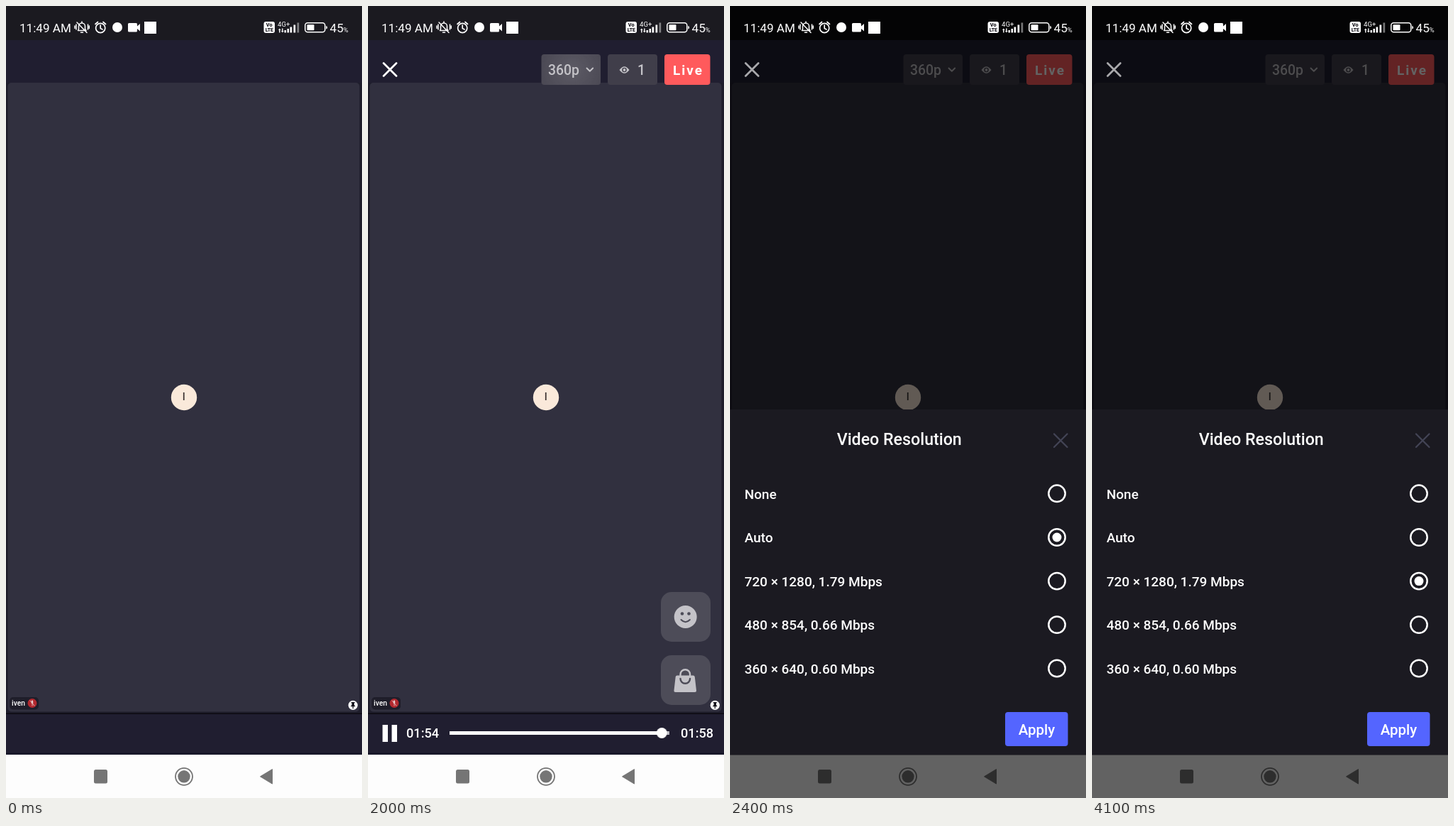
These frames come from a looping animation (502x1115 px, 4300 ms). An HTML page:

```html
<!DOCTYPE html>
<html lang="en">
<head>
<meta charset="utf-8">
<title>Live player</title>
<style>
html, body { margin: 0; width: 100%; height: 100%; overflow: hidden; background: #201e30; }
svg { display: block; width: 100vw; height: 100vh; }
text { font-family: Roboto, "Open Sans", sans-serif; font-weight: 500; fill: #fff; }
.soft { fill: #c4c3c8; }
.line { fill: none; stroke: #fff; stroke-linecap: round; stroke-linejoin: round; }
.mid { text-anchor: middle; }

/* 43 ticks of 100 ms; each value holds until the next */
.controls, .close, .t52, .t53, .t54, .knob, .played, .ripple, .dim, .sheet, .auto, .hd {
  animation: 4300ms step-end infinite;
}
.controls { animation-name: controls; }
.close { animation-name: close; }
.t52 { animation-name: t52; }
.t53 { animation-name: t53; }
.t54 { animation-name: t54; }
.knob { animation-name: knob; }
.played { animation-name: played; transform-origin: 115px 0; }
.ripple { animation-name: ripple; }
.dim { animation-name: dim; }
.sheet { animation-name: sheet; }
.auto { animation-name: auto; }
.hd { animation-name: hd; }

@keyframes controls { 0% { opacity: 0 } 13.953%, 100% { opacity: 1 } }
@keyframes close {
  0% { opacity: 0 } 13.953% { opacity: 1 } 48.837% { opacity: .82 }
  51.163% { opacity: .7 } 53.488%, 100% { opacity: .65 }
}
@keyframes t52 { 0% { opacity: 1 } 23.256%, 100% { opacity: 0 } }
@keyframes t53 { 0% { opacity: 0 } 23.256% { opacity: 1 } 46.512%, 100% { opacity: 0 } }
@keyframes t54 { 0% { opacity: 0 } 46.512%, 100% { opacity: 1 } }
@keyframes knob {
  0% { transform: translateX(410.5px) } 23.256% { transform: translateX(412px) }
  46.512%, 100% { transform: translateX(414.3px) }
}
@keyframes played {
  0% { transform: scaleX(295) } 23.256% { transform: scaleX(297) }
  46.512%, 100% { transform: scaleX(299) }
}
@keyframes ripple {
  0% { opacity: 0 } 44.186% { opacity: .5 } 46.512% { opacity: 1 }
  51.163% { opacity: .45 } 53.488%, 100% { opacity: 0 }
}
@keyframes dim {
  0% { opacity: 0 } 48.837% { opacity: .32 } 51.163% { opacity: .52 }
  53.488%, 100% { opacity: .61 }
}
@keyframes sheet {
  0% { opacity: 0; transform: translateY(223px) }
  48.837% { opacity: .38; transform: translateY(147px) }
  51.163% { opacity: .85; transform: translateY(33.5px) }
  53.488%, 100% { opacity: 1; transform: none }
}
@keyframes auto { 0% { opacity: 1 } 81.395%, 100% { opacity: 0 } }
@keyframes hd { 0% { opacity: 0 } 81.395%, 100% { opacity: 1 } }
</style>
</head>
<body>
<svg viewBox="0 0 502 1115" preserveAspectRatio="none">
  <defs>
    <radialGradient id="glow" gradientUnits="userSpaceOnUse" cx="288" cy="90" r="46">
      <stop offset="0" stop-color="#fff" stop-opacity=".15"/>
      <stop offset="1" stop-color="#fff" stop-opacity=".06"/>
    </radialGradient>
    <circle id="ring" cx="461" r="11.7" fill="none" stroke="#fff" stroke-width="2.5"/>
  </defs>

  <!-- Stage -->
  <rect width="502" height="1115" fill="#201e30"/>
  <rect width="502" height="48" fill="#1b1a20"/>
  <rect y="108" width="502" height="888" fill="#1e1d2b"/>
  <rect x="2.5" y="108" width="496" height="885.5" rx="5" fill="#31303f"/>
  <rect y="995.5" width="502" height="1.5" fill="#0c0b12"/>
  <rect y="1051" width="502" height="3" fill="#19182a"/>

  <!-- Participant -->
  <circle cx="251" cy="551" r="18.2" fill="#fae9da"/>
  <text class="mid" x="250.8" y="555.3" font-size="14" style="fill:#3a3230">I</text>
  <rect x="5" y="973" width="41" height="17.5" rx="5" fill="#1f1e2a"/>
  <text x="8" y="985" font-size="10.3">iven</text>
  <circle cx="37" cy="981.5" r="6.5" fill="#b3292f"/>
  <rect x="35.8" y="977.5" width="2.4" height="5" rx="1.2" fill="#e9c9ca"/>
  <path class="line" d="M34 978l6 7M37 983.500v1.500" style="stroke:#e9c9ca" stroke-width=".9"/>
  <circle cx="489.300" cy="984.300" r="6.600" fill="#fff"/>
  <path d="M486.800 980h5v1l-.8.500v2.500l1.300 1.500v.800h-2.400v3h-1.200v-3h-2.400v-.800l1.300-1.500v-2.500l-.8-.500z" fill="#15141c"/>

  <!-- Player controls -->
  <g class="controls">
    <rect x="244.500" y="68" width="83.500" height="43" rx="4" fill="#403e4a"/>
    <rect class="ripple" x="244.500" y="68" width="83.500" height="43" rx="4" fill="url(#glow)"/>
    <text class="soft" x="254" y="97.300" font-size="19.400">360p</text>
    <path class="line" d="M308.500 87.500l4.300 4.300 4.300-4.300" style="stroke:#c4c3c8" stroke-width="2"/>
    <rect x="338" y="68" width="70" height="43" rx="4" fill="#403e4a"/>
    <path class="soft" d="M354.500 90q7-9.500 14 0q-7 9.500-14 0z"/>
    <circle cx="361.500" cy="90" r="3.300" fill="#403e4a"/>
    <circle class="soft" cx="361.500" cy="90" r="1.900"/>
    <text class="soft" x="380" y="97.300" font-size="19.400">1</text>
    <rect x="418" y="68" width="64.500" height="43" rx="4" fill="#ff5a5c"/>
    <text x="430" y="97.300" font-size="19" style="font-weight:700;letter-spacing:2px">Live</text>

    <rect x="413" y="825" width="70" height="70" rx="15" fill="#4d4c58"/>
    <circle class="soft" cx="447.700" cy="860" r="16"/>
    <circle cx="443" cy="855.500" r="2.300" fill="#4d4c58"/>
    <circle cx="452.500" cy="855.500" r="2.300" fill="#4d4c58"/>
    <path class="line" d="M441.500 864q6.200 6.500 12.400 0" style="stroke:#4d4c58" stroke-width="2"/>
    <rect x="413" y="914" width="70" height="70" rx="15" fill="#4d4c58"/>
    <path class="soft" d="M436 942.500h22.500q2 0 2.300 2l2.200 19q.2 2.500-2.300 2.500h-27q-2.500 0-2.200-2.500l2.200-19q.3-2 2.300-2z"/>
    <path class="line" d="M440.500 942.500v-1.500a6.800 6.800 0 0 1 13.600 0v1.500" style="stroke:#c4c3c8" stroke-width="2.400"/>
    <path class="line" d="M440.500 947a6.800 6.800 0 0 0 13.600 0" style="stroke:#4d4c58" stroke-width="2.400"/>

    <path d="M20.500 1012h7.500v24h-7.500zM33.500 1012h7.500v24h-7.500z" fill="#fff"/>
    <g font-size="18.200">
      <text class="t52" x="54" y="1030.200">01:52</text>
      <text class="t53" x="54" y="1030.200">01:53</text>
      <text class="t54" x="54" y="1030.200">01:54</text>
      <text x="441" y="1030.200">01:58</text>
    </g>
    <rect x="115" y="1021" width="310" height="5" fill="#b9b8c0"/>
    <rect class="played" x="115" y="1021" width="1" height="5" fill="#fff"/>
    <circle class="knob" cy="1023.500" r="7.500" fill="#fff"/>
  </g>

  <!-- Navigation bar -->
  <rect y="1054" width="502" height="61" fill="#fdfdfd"/>
  <g fill="#757575">
    <rect x="124" y="1075" width="19" height="19.500" rx="2.500"/>
    <circle cx="251" cy="1084.800" r="8.700"/>
    <circle cx="251" cy="1084.800" r="12" fill="none" stroke="#757575" stroke-width="1.800"/>
    <path d="M358.500 1084.800l17-10.300v20.600z" stroke="#757575" stroke-linejoin="round"/>
  </g>

  <rect class="dim" width="502" height="1115"/>
  <rect class="dim" width="502" height="48"/>
  <path class="line close" d="M22 80.500l18 18M40 80.500l-18 18" stroke-width="2.700"/>

  <!-- Status bar -->
  <g fill="#fff">
    <text x="19" y="36.800" font-size="17.100" style="font-weight:400">11:49 AM</text>
    <path class="line" stroke-width="1.500" d="M101.500 34.500h11.500l-1.500-2v-4a4.500 4.500 0 0 0-9 0v4zM107 22v1.500M105.500 37.300h3M100 23l14 14.500M99 26v7M97 28v3.500M115.500 26v7M117.300 28v3.500"/>
    <path class="line" stroke-width="1.700" d="M126 25.500l3.500-3M140.500 25.500l-3.500-3M133.200 27v4.500l2.800 1.500"/>
    <circle class="line" cx="133.200" cy="31" r="6.600" stroke-width="1.700"/>
    <circle cx="157" cy="30" r="7"/>
    <path d="M173.500 24h10q1.500 0 1.500 1.500v3l4-3.500v10.500l-4-3.500v3q0 1.500-1.500 1.500h-10q-1.500 0-1.500-1.500v-9.500q0-1.500 1.500-1.500z"/>
    <rect x="195" y="22" width="17" height="17"/>
    <rect x="363.500" y="22" width="15.500" height="16" rx="3"/>
    <text class="mid" x="371.200" y="29.300" font-size="7.300" style="fill:#1b1a20;font-weight:900">Vo</text>
    <text class="mid" x="371.200" y="36.400" font-size="6.800" style="fill:#1b1a20;font-weight:900">LTE</text>
    <text x="383" y="28.600" font-size="9.600" style="font-weight:400">4G+</text>
    <path d="M384 34l1.800-2.500 1.800 2.500h-1.100v3.500h-1.400v-3.500zM388 35h1.100v-3.500h1.400v3.500h1.100l-1.800 2.500z"/>
    <path d="M392.500 34h2.500v3.500h-2.500zM396.500 32h2.500v5.500h-2.500zM400.500 29.500h2.700v8h-2.700zM405.500 26.500h2.700v11h-2.700z"/>
    <path d="M410.500 23.500h2.700v14h-2.700z" opacity=".45"/>
    <rect class="line" x="421.800" y="23.800" width="28" height="13" rx="3.500" stroke-width="1.500"/>
    <rect x="424.500" y="26.300" width="10" height="8" rx="1"/>
    <path d="M451.300 28q1.800 0 1.800 2.300t-1.800 2.300z"/>
    <text x="456.500" y="36.800" font-size="17.300" style="font-weight:400">45</text>
    <text x="475.800" y="36.800" font-size="9.500" style="font-weight:400">%</text>
  </g>

  <!-- Resolution sheet -->
  <g class="sheet">
    <rect y="568" width="502" height="486.500" fill="#1b1a21"/>
    <text class="mid" x="238.700" y="618" font-size="23.200">Video Resolution</text>
    <path class="line" d="M457 602.500l18.500 18.500M475.500 602.500l-18.500 18.500" style="stroke:#434455" stroke-width="2.300"/>
    <g font-size="19">
      <text x="20.500" y="693.500">None</text>
      <text x="20.500" y="755.200">Auto</text>
      <text x="20.500" y="816.900">720 × 1280, 1.79 Mbps</text>
      <text x="20.500" y="878.400">480 × 854, 0.66 Mbps</text>
      <text x="20.500" y="939.900">360 × 640, 0.60 Mbps</text>
    </g>
    <use href="#ring" y="686.300"/>
    <use href="#ring" y="748"/>
    <use href="#ring" y="809.600"/>
    <use href="#ring" y="871.100"/>
    <use href="#ring" y="932.500"/>
    <circle class="auto" cx="461" cy="748" r="6.500" fill="#fff"/>
    <circle class="hd" cx="461" cy="809.600" r="6.500" fill="#fff"/>
    <rect x="388" y="994" width="88.500" height="48" rx="4" fill="#5465ff"/>
    <text class="mid" x="432.500" y="1025.500" font-size="20.500">Apply</text>
  </g>
</svg>
</body>
</html>
```
